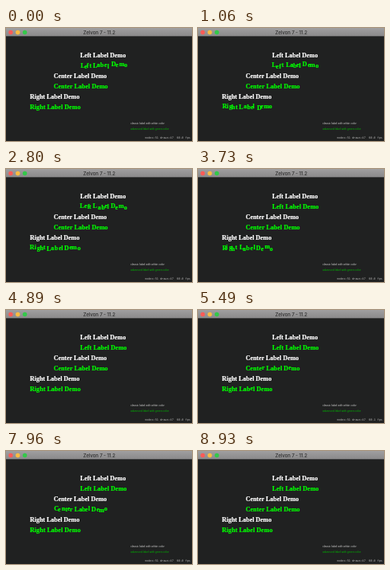
Recreate the animation shown at these times as an HTML page. Size 233 px wide and 142 px high, loop 8.96 s.

```html
<!DOCTYPE html>
<html lang="en">
<head>
<meta charset="utf-8">
<title>Label demo</title>
<style>
  html, body { margin: 0; width: 100%; height: 100%; overflow: hidden; background: #202121; }
  svg { display: block; width: 100%; height: 100%; }
  text { white-space: pre; }
  .label { font: 700 7.95px "Liberation Serif", "Times New Roman", serif; font-kerning: none; fill: #fff; stroke: #fff; stroke-width: .2px; }
  .moving { fill: #0f0; stroke: #0f0; letter-spacing: .08px; }
  .note { font: 3.42px "Liberation Sans", Arial, sans-serif; fill: #ccc; }
  .stats { font: 3.5px "DejaVu Sans Mono", monospace; fill: #bbb; }
  .title { font: 500 5.9px Inter, sans-serif; fill: #2c2c2c; text-anchor: middle; }
</style>
</head>
<body>
<svg id="stage" viewBox="0 0 233 142">
  <linearGradient id="bar" x2="0" y2="1">
    <stop stop-color="#a09fa0"/>
    <stop offset="1" stop-color="#8a898a"/>
  </linearGradient>
  <rect width="233" height="142" fill="#202121"/>
  <rect width="233" height="10.3" fill="url(#bar)"/>
  <circle cx="5.9" cy="5.5" r="2.7" fill="#fc5b57"/>
  <circle cx="14.8" cy="5.5" r="2.7" fill="#fdbc40"/>
  <circle cx="23.6" cy="5.5" r="2.7" fill="#34c84a"/>
  <text class="title" x="116.8" y="7.7">Zelvon 7 - 11.2</text>
  <text class="note" x="156" y="121">classic label with white color</text>
  <text class="note" x="156" y="127.6" style="fill:#00b400">advanced label with green color</text>
  <text class="stats" x="174" y="139">nodes:51 draws:47  <tspan id="fps">60.0</tspan> fps</text>
</svg>
<script>
const LOOP = 8960, STEP = 36, BEAT = 330, FIRST = 100;
const stage = document.getElementById("stage");
const fps = document.getElementById("fps");

function addText(cls, x, y, str) {
  const el = document.createElementNS("http://www.w3.org/2000/svg", "text");
  el.setAttribute("class", cls);
  el.setAttribute("x", x);
  el.setAttribute("y", y);
  el.textContent = str;
  stage.append(el);
  return el;
}

function makeLabel(str, x, y, from, to, seed) {
  addText("label", x, y, str);
  const el = addText("label moving", x, y + 13, str);
  const home = [...str].map((_, i) => el.getStartPositionOfChar(i).x);
  return { el, home, y: y + 13, from, to, seed };
}

const labels = [
  makeLabel("Left Label Demo", 92.9, 36.7, 0, 3670, 11),
  makeLabel("Center Label Demo", 59.7, 62.7, 4400, 8900, 23),
  makeLabel("Right Label Demo", 30, 88.8, FIRST, 6360, 37)
];

// Repeatable noise in -1..1
function noise(a, b, c) {
  const v = Math.sin(a * 12.9898 + b * 78.233 + c * 37.719) * 43758.5453;
  return (v - Math.floor(v)) * 2 - 1;
}

// Each letter jumps around its home; all letters swell and settle together
function shake(label, t) {
  const active = t >= label.from && t < label.to;
  const time = Math.max(t, FIRST);
  const gain = active ? 0.5 + 0.5 * Math.cos((time - FIRST) / BEAT * 2 * Math.PI) : 0;
  const step = Math.floor(time / STEP);
  const offset = (i, axis, size) => gain * size * noise(step, i + axis * 50, label.seed);
  label.el.setAttribute("x", label.home.map((x, i) => (x + offset(i, 0, 1)).toFixed(2)).join(" "));
  label.el.setAttribute("y", label.home.map((_, i) => (label.y + offset(i, 1, 1.5)).toFixed(2)).join(" "));
}

function render(t) {
  for (const label of labels) shake(label, t);
  fps.textContent = t >= 5100 && t < 6100 ? "60.1" : "60.0";
}

const start = performance.now();
function tick() {
  render((performance.now() - start) % LOOP);
  requestAnimationFrame(tick);
}
tick();
</script>
</body>
</html>
```
